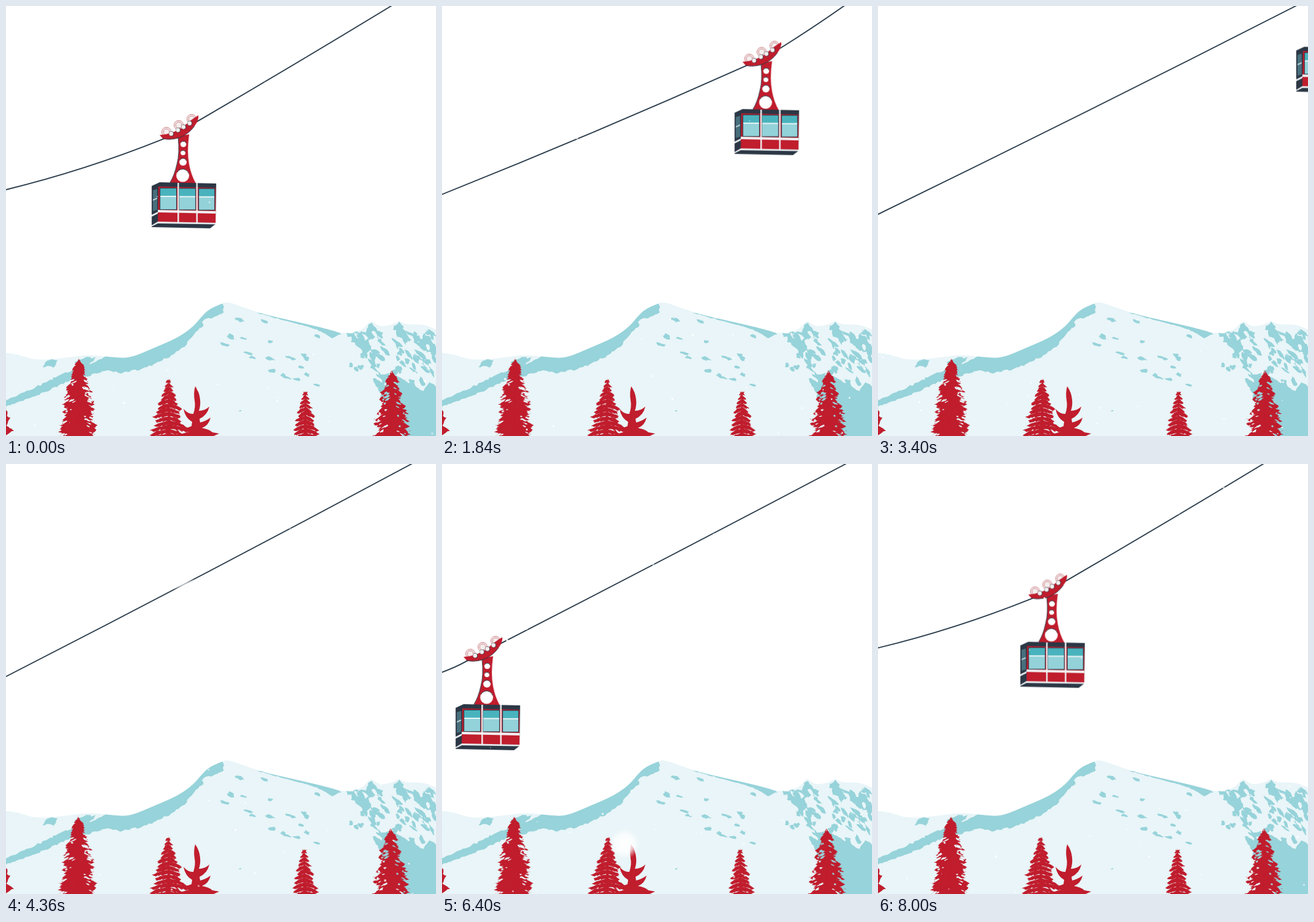
Animation, 700 px wide and 700 px high, one loop 8040 ms. Source, as an HTML page with a canvas:

```html
<!DOCTYPE html>
<html lang="en">
<head>
<meta charset="utf-8">
<title>Cable car</title>
<style>
  html, body { margin: 0; width: 100%; height: 100%; overflow: hidden; background: #fff; }
  canvas { display: block; }
</style>
</head>
<body>
<canvas id="stage" width="700" height="700"></canvas>
<script>
const SIZE = 700, LOOP = 8040;
const RED = '#c01d2d', DARK = '#2c3745', ICE = '#e9f5f8', SHADE = '#97d3da', TEAL = '#49b3bd', GLASS = '#93d2d9';
const ctx = document.getElementById('stage').getContext('2d');

function seeded(seed) {
  return () => {
    seed = (seed + 0x6D2B79F5) | 0;
    let v = Math.imul(seed ^ (seed >>> 15), 1 | seed);
    v = (v + Math.imul(v ^ (v >>> 7), 61 | v)) ^ v;
    return ((v ^ (v >>> 14)) >>> 0) / 4294967296;
  };
}

function layer() {
  const c = document.createElement('canvas');
  c.width = c.height = SIZE;
  return c.getContext('2d');
}

// "x,y x,y ..." to pairs
const pts = text => text.split(' ').map(p => p.split(',').map(Number));

function fill(g, points, color) {
  g.beginPath();
  points.forEach(p => g.lineTo(p[0], p[1]));
  g.closePath();
  g.fillStyle = color;
  g.fill();
}

function disc(g, x, y, r, color) {
  g.beginPath();
  g.arc(x, y, r, 0, 7);
  g.fillStyle = color;
  g.fill();
}

// Subdivide the edges and shake the new points
function rough(points, amp, rnd) {
  const out = [];
  points.forEach((a, i) => {
    const b = points[(i + 1) % points.length];
    const n = Math.max(1, Math.round(Math.hypot(b[0] - a[0], b[1] - a[1]) / 4));
    for (let k = 0; k < n; k++) {
      out.push([0, 1].map(j => a[j] + (b[j] - a[j]) * k / n + (rnd() - 0.5) * amp));
    }
  });
  return out;
}

function blob(g, x, y, rx, ry, angle, color, rnd) {
  const shape = [], c = Math.cos(angle), s = Math.sin(angle);
  for (let i = 0; i < 9; i++) {
    const a = i / 9 * Math.PI * 2, k = 0.55 + rnd() * 0.75;
    const u = Math.cos(a) * rx * k, v = Math.sin(a) * ry * k;
    shape.push([x + u * c - v * s, y + u * s + v * c]);
  }
  fill(g, shape, color);
}

function mountain(g) {
  const rnd = seeded(11);
  const ridge = pts('0,565 14,566 30,571 48,576 78,575 108,571 135,568 160,570 185,573 205,572 240,557 280,540 305,522 318,506 330,494 350,485 360,481 385,490 420,502 455,510 490,518 520,525 540,531 558,533 578,528 588,519 594,511 605,521 620,521 632,517 641,512 650,519 680,518 700,527');
  g.save();
  g.beginPath();
  g.moveTo(0, 700);
  g.lineTo(0, 565);
  ridge.slice(1).forEach((p, i) => {
    const q = ridge[i + 2] || p;
    g.quadraticCurveTo(p[0], p[1], (p[0] + q[0]) / 2, (p[1] + q[1]) / 2);
  });
  g.lineTo(700, 527);
  g.lineTo(700, 700);
  g.clip();
  g.fillStyle = ICE;
  g.fillRect(0, 470, 700, 230);

  const shade = (text, amp) => fill(g, rough(pts(text), amp, rnd), SHADE);
  shade('-4,643 30,629 60,615 85,602 112,592 135,583 160,572 185,568 205,566 240,550 280,533 305,515 330,486 350,480 356,490 353,498 344,505 330,508 320,514 322,520 310,531 298,543 291,555 262,573 222,591 186,597 168,593 138,601 102,611 62,630 32,640 -4,654', 3);
  shade('60,588 71,576 86,575 79,588', 4);
  shade('112,578 128,572 148,573 126,588', 4);
  shade('408,499 440,504 470,511 520,522 546,534 530,541 514,530 478,518 434,507', 1.5);
  shade('556,533 586,529 594,520 604,536 592,546 594,558 580,574 570,556', 5);
  shade('589,520 595,514 602,526 606,540 590,538', 4);
  shade('630,522 641,515 652,533 664,548 640,540', 4);
  shade('652,530 682,534 700,550 700,568 672,556', 5);
  shade('598,607 622,596 642,604 660,614 678,626 690,612 704,624 704,704 648,704 634,676 616,646', 4);

  for (let i = 0; i < 105; i++) {
    const x = 566 + rnd() * 134, low = Math.min(616, 548 + (x - 560) * 1.25);
    const y = 528 + rnd() * (low - 528);
    blob(g, x, y, 4 + rnd() * 7, 1.5 + rnd() * 3, 0.5 + rnd() * 0.8, i % 4 ? SHADE : ICE, rnd);
  }
  const spots = pts('381,511 420,513 366,538 356,551 386,541 395,566 401,572 430,546 430,574 459,571 466,574 485,568 489,574 452,601 458,605 474,608 490,600 505,617 508,538 562,584 570,591 578,588 434,594 480,588');
  spots.forEach(([x, y]) => blob(g, x, y, 4 + rnd() * 4, 2 + rnd() * 2.5, 0.3, SHADE, rnd));
  blob(g, 381, 659, 2, 1.3, 0, SHADE, rnd);
  g.restore();
}

function conifer(x, top, half, seed, dense) {
  const g = layer(), rnd = seeded(seed), step = dense ? 4 : 7;
  fill(g, [[x, top], [x + 3, 705], [x - 3, 705]], RED);
  for (let y = top + 2; y < 708; y += step) {
    const p = (y - top) / (700 - top);
    for (const side of [-1, 1]) {
      const w = half * Math.pow(p, dense ? 0.5 : 0.85) * (0.68 + rnd() * 0.4);
      const tipY = y + w * 0.14 + rnd() * 3, t = dense ? 4 : 2.5;
      const arm = [[x, y - t - 2], [x + side * w * 0.6, y - 1], [x + side * w, tipY],
        [x + side * w * 0.8, tipY + 2.5], [x + side * w * 0.5, y + t + 1], [x, y + t]];
      fill(g, rough(arm, dense ? 2.5 : 1.6, rnd), RED);
      for (let k = 0.35; k < 0.95; k += 0.2) {
        blob(g, x + side * w * k, y + w * 0.1 * k + 2, 3 + rnd() * 2, 1.6, side * 0.6, RED, rnd);
      }
    }
  }
  if (dense) {
    g.globalCompositeOperation = 'destination-out';
    for (let i = 0; i < 46; i++) {
      const p = 0.15 + rnd() * 0.85, side = rnd() < 0.5 ? -1 : 1;
      const dx = half * Math.sqrt(p) * (0.3 + rnd() * 0.65);
      blob(g, x + side * dx, top + p * (700 - top), 1.5 + rnd() * 4, 0.8 + rnd() * 1.2, side * 0.5, '#000', rnd);
    }
  }
  return g.canvas;
}

function curlyTree(g) {
  g.fillStyle = RED;
  g.fill(new Path2D('M308 619 Q315 629 316 641 Q317 650 314 659 Q324 659 331 652 Q328 666 315 672 L316 678 Q325 676 333 670 Q330 683 319 687 Q331 689 336 694 L347 696 L338 700 H286 L284 697 L298 693 Q286 692 284 685 Q292 689 302 684 L303 677 Q292 671 289 656 Q297 665 305 664 Q309 652 307 642 Q305 630 308 619 Z'));
  const rnd = seeded(5);
  fill(g, rough(pts('-2,655 3,660 1,668 7,671 3,676 1,684 13,691 2,697 -2,700'), 1.5, rnd), RED);
}

function cabin(g) {
  // Wheels
  [[261, 205], [281, 194], [302, 184]].forEach(([x, y]) => {
    disc(g, x, y, 8, '#f4eeee');
    g.strokeStyle = '#cf8288';
    g.lineWidth = 1;
    for (const r of [7.6, 5]) {
      g.beginPath();
      g.arc(x, y, r, 0, 7);
      g.stroke();
    }
  });
  // Hanger
  g.fillStyle = RED;
  g.strokeStyle = DARK;
  g.lineWidth = 1;
  const arm = new Path2D('M280 212 Q283 240 278 258 Q274 276 266 289 H309 Q301 275 298 258 Q294 238 298 209 Z');
  g.fill(arm);
  g.stroke(new Path2D('M280 214 Q283 240 278 258 Q274 276 267 287'));
  [[288.5, 225, 4.8], [288, 239, 4], [288, 254, 6], [287.5, 276, 10.5]].forEach(([x, y, r]) => {
    disc(g, x, y, r, '#fff');
    g.beginPath();
    g.arc(x, y, r, 3.6, 6);
    g.stroke();
  });
  // Carriage
  g.fillStyle = RED;
  const boat = new Path2D('M250 210 Q271 209 288 197 Q302 184 313 178 Q314 186 307 195 Q298 208 283 214 Q268 219 255 216 Z');
  g.fill(boat);
  g.stroke(new Path2D('M255 216 Q268 219 283 214 Q298 208 307 195'));
  [[269, 208], [280, 202], [289, 197], [299, 191]].forEach(([x, y]) => {
    disc(g, x, y, 4, DARK);
    disc(g, x - 0.3, y, 3.4, '#f6eeee');
  });
  // Box
  fill(g, pts('237,293 250,287 342,289 341,355 332,362 237,360'), DARK);
  fill(g, pts('248,294 341,296 341,353 247,352'), RED);
  fill(g, pts('239,300 246,298 246,332 239,334'), '#486f7d');
  fill(g, pts('237,340 247,335 247,338 237,343'), '#eef3f4');
  fill(g, pts('239,315 246,312 246,314 239,317'), '#c9dde1');
  [[251, 277], [282, 308], [314, 339]].forEach(([a, b], i) => {
    g.fillStyle = DARK;
    g.fillRect(a - 1, 296 + i * 0.4, b - a + 2, 36);
    g.fillStyle = TEAL;
    g.fillRect(a, 297 + i * 0.4, b - a, 13);
    g.fillStyle = GLASS;
    g.fillRect(a, 310 + i * 0.4, b - a, 21);
    g.fillStyle = '#e8f5f6';
    g.fillRect(a, 309 + i * 0.4, b - a, 2);
  });
  fill(g, pts('247,332 341,334 341,338 247,336'), '#f3f3f4');
  fill(g, pts('237,357 247,351 341,353 341,355.5 247,354 237,359'), '#e9edef');
  for (const x of [279, 309.5]) {
    g.fillStyle = '#f3f3f4';
    g.fillRect(x, 288, 2.4, 65);
  }
}

// Periodic smooth interpolation; rows start with their time
function smooth(rows, t) {
  const n = rows.length, at = i => {
    const turn = Math.floor(i / n), row = rows[i - turn * n];
    return [row[0] + turn * LOOP, ...row.slice(1)];
  };
  let i = n - 1;
  while (rows[i][0] > t) i--;
  const [a, b, c, d] = [at(i - 1), at(i), at(i + 1), at(i + 2)];
  const h = c[0] - b[0], u = (t - b[0]) / h;
  return b.slice(1).map((v, j) => {
    const k = j + 1;
    const m0 = (c[k] - a[k]) / (c[0] - a[0]) * h, m1 = (d[k] - b[k]) / (d[0] - b[0]) * h;
    return v * (2 * u ** 3 - 3 * u * u + 1) + m0 * (u ** 3 - 2 * u * u + u)
      + c[k] * (3 * u * u - 2 * u ** 3) + m1 * (u ** 3 - u * u);
  });
}

function linear(rows, t) {
  let i = rows.length - 2;
  while (rows[i][0] > t) i--;
  const a = rows[i], b = rows[i + 1], u = (t - a[0]) / (b[0] - a[0]);
  return [1, 2].map(k => a[k] + (b[k] - a[k]) * u);
}

// time, grip x, grip y
const RIDE = [[0, 283, 204], [1160, 433, 129], [2560, 616.5, 38], [3700, 766, -36], [3701, -286, 482],
  [6400, 68, 308], [7400, 199, 244], [8000, 277.5, 206.5], [8040, 283, 204]];
// time, height at the left edge, x at the top edge, sag
const ROPE = [[0, 299, 627, 5], [1160, 295, 634, 4], [2560, 323, 679, 2], [3100, 334, 690, 2], [3700, 343, 668, 2],
  [4360, 346, 660, 2], [5600, 346, 660, 2], [6400, 339, 657, 1], [7400, 312, 630, 5]];

function bow(x0, y0, x1, y1, sag) {
  ctx.quadraticCurveTo((x0 + x1) / 2, (y0 + y1) / 2 + sag * 2, x1, y1);
}

function rope(t, x, y) {
  const [left, right, sag] = smooth(ROPE, t);
  ctx.beginPath();
  ctx.moveTo(0, left);
  if (x > 28 && y > 2) {
    bow(0, left, x - 28, y + 13, sag);
    ctx.lineTo(x + 30, y - 17);
    if (y > 17) bow(x + 30, y - 17, right, 0, 1);
  } else {
    bow(0, left, right, 0, 2);
  }
  ctx.lineTo(right + 8, -5);
  ctx.strokeStyle = '#2b3d4c';
  ctx.lineWidth = 1.9;
  ctx.stroke();
}

const flakes = (() => {
  const rnd = seeded(42);
  return Array.from({ length: 130 }, () => ({
    x: rnd() * 700, y: rnd() * 740, r: 0.6 + rnd() * 1.4, falls: 1 + Math.floor(rnd() * 3),
    sway: rnd() * 12, phase: rnd() * 6.28, alpha: 0.45 + rnd() * 0.5
  }));
})();

function snow(t) {
  const p = t / LOOP;
  flakes.forEach(f => {
    const y = (f.y + 740 * f.falls * p) % 740 - 20;
    const x = f.x + Math.sin(p * Math.PI * 4 + f.phase) * f.sway;
    disc(ctx, x, y, f.r, `rgba(255,255,255,${f.alpha})`);
  });
  const x = 297, y = 618 + (t - 6400) * 0.2;
  const glow = ctx.createRadialGradient(x, y, 4, x, y, 25);
  glow.addColorStop(0, 'rgba(255,255,255,.95)');
  glow.addColorStop(0.5, 'rgba(255,255,255,.75)');
  glow.addColorStop(1, 'rgba(255,255,255,0)');
  disc(ctx, x, y, 25, glow);
}

const land = layer(), front = layer(), car = layer();
mountain(land);
curlyTree(front);
cabin(car);

const quick = t => -2.2 * Math.sin(t / 2010 * Math.PI * 2);
const slow = t => -3.2 * Math.cos((t / 4020 - 0.1) * Math.PI * 2);
const trees = [
  { img: conifer(118.5, 578, 35, 3, true), top: 578, lean: t => quick(t) * 0.5 },
  { img: conifer(267, 607, 37, 8, false), top: 607, lean: slow },
  { img: conifer(487.3, 627, 27, 21, false), top: 627, lean: quick },
  { img: conifer(628, 597, 33, 15, true), top: 597, lean: quick }
];

function draw(t) {
  ctx.fillStyle = '#fff';
  ctx.fillRect(0, 0, SIZE, SIZE);
  ctx.drawImage(land.canvas, 0, 0);
  const [x, y] = linear(RIDE, t);
  rope(t, x, y);
  ctx.drawImage(car.canvas, x - 283, y - 204);
  trees.forEach(tree => {
    const pivot = 800, k = tree.lean(t) / (tree.top - pivot);
    ctx.save();
    ctx.transform(1, 0, k, 1, -k * pivot, 0);
    ctx.drawImage(tree.img, 0, 0);
    ctx.restore();
  });
  ctx.drawImage(front.canvas, 0, 0);
  snow(t);
}

const start = performance.now();
function tick() {
  draw((performance.now() - start) % LOOP);
  requestAnimationFrame(tick);
}
tick();
</script>
</body>
</html>
```
